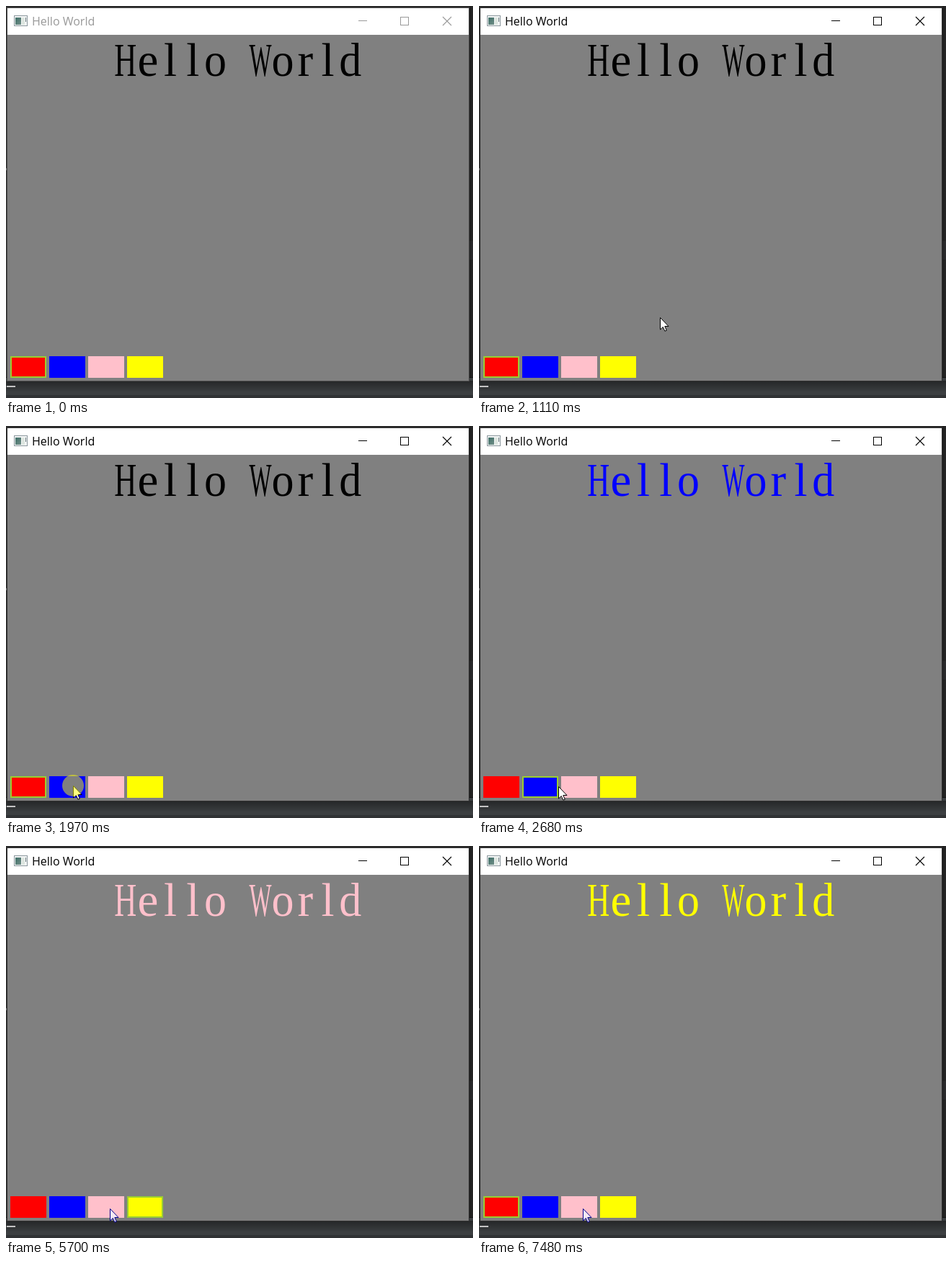
Write an HTML page with a canvas that moves like this. It is 648x544 px and loops after 8000 ms.

```html
<!DOCTYPE html>
<html lang="en">
<head>
<meta charset="utf-8">
<title>Hello World</title>
<style>
  html, body { margin: 0; width: 100%; height: 100%; overflow: hidden; background: #2b2b2b; }
  canvas { display: block; }
</style>
</head>
<body>
<canvas id="stage" width="648" height="544"></canvas>
<script>
const ctx = document.getElementById('stage').getContext('2d');
const LOOP = 8000;
const COLORS = ['#ff0000', '#0000ff', '#ffc0cb', '#ffff00'];

// Each entry: [start time, value]
const SELECTED = [[0, 0], [2220, 1], [3380, 2], [5700, 3], [7480, 0]];
const TEXT_COLOR = [[0, '#000000'], [2220, COLORS[1]], [3380, COLORS[2]], [6790, COLORS[3]]];
const MOVES = [
  { start: 340, end: 570, steps: 4, from: [502, 504], to: [361, 367], power: 1.6 },
  { start: 1110, end: 1750, steps: 9, from: [251, 432], to: [93, 499], power: 1.8 },
  { start: 2680, end: 2920, steps: 4, from: [110, 500], to: [144, 503], power: 1.5 }
];
const CLICKS = [[800, 960], [1970, 2220], [3150, 3380]];
const ARROW = [[0, 0], [0, 16.5], [3.8, 13], [6.4, 18.7], [8.8, 17.7], [6.3, 12], [11.5, 12]];

const valueAt = (track, t) => track.filter(([start]) => start <= t).pop()[1];

function rect(x, y, w, h, color) {
  ctx.fillStyle = color;
  ctx.fillRect(x, y, w, h);
}

function frame(x, y, w, h, color, line = 1) {
  ctx.strokeStyle = color;
  ctx.lineWidth = line;
  ctx.strokeRect(x + line / 2, y + line / 2, w - line, h - line);
}

function fade(x0, y0, x1, y1, w, h, alpha) {
  const g = ctx.createLinearGradient(x0, y0, x1, y1);
  g.addColorStop(0, `rgba(0,0,0,${alpha})`);
  g.addColorStop(1, 'rgba(0,0,0,0)');
  rect(x0, y0, w, h, g);
}

function cursorAt(t) {
  const m = MOVES.filter(move => move.start <= t).pop();
  if (!m) return null;
  const last = m.steps - 1;
  const gap = (m.end - m.start) / last;
  const step = Math.min(last, Math.floor((t - m.start) / gap + 0.001));
  const k = 1 - Math.pow(1 - step / last, m.power);
  return m.from.map((v, i) => Math.round(v + (m.to[i] - v) * k));
}

function drawDesktop() {
  rect(0, 0, 648, 544, '#2b2b2b');
  rect(643, 326, 5, 26, '#323335');
  rect(0, 515, 648, 1, '#151515');
  rect(0, 516, 648, 24, '#3c3f41');
  rect(0, 540, 648, 4, '#303234');
  fade(0, 520, 0, 536, 648, 16, 0.4);
  fade(643, 0, 651, 0, 5, 516, 0.3);
  rect(0, 225, 2, 3, '#777777');
  rect(1, 527, 12, 2, '#c4c4c4');
}

function drawIcon() {
  rect(11, 13, 19, 15, '#8b979d');
  rect(12, 14, 17, 13, '#f4f6f6');
  const g = ctx.createLinearGradient(13, 16, 21, 26);
  g.addColorStop(0, '#3f6f68');
  g.addColorStop(1, '#718f88');
  rect(13, 16, 8, 10, g);
  rect(22, 16, 4, 10, '#dce5df');
  rect(27, 16, 1, 6, '#66757b');
}

function drawTitleBar(active) {
  const ink = active ? '#000000' : '#999999';
  rect(2, 3, 640, 37, '#ffffff');
  drawIcon();
  ctx.fillStyle = ink;
  ctx.textAlign = 'left';
  ctx.font = '16px "Open Sans", "Noto Sans", sans-serif';
  ctx.fillText('Hello World', 36, 27);
  rect(489, 20, 12, 1, ink);
  frame(547, 15, 12, 12, ink);
  ctx.beginPath();
  ctx.moveTo(606, 15);
  ctx.lineTo(618, 27);
  ctx.moveTo(618, 15);
  ctx.lineTo(606, 27);
  ctx.lineWidth = 1.1;
  ctx.stroke();
}

// Half-width lettering: one even cell per character
function drawHeading(color) {
  ctx.fillStyle = color;
  ctx.textAlign = 'center';
  ctx.font = '65px "Liberation Serif", "Noto Serif", serif';
  [...'Hello World'].forEach((ch, i) => ctx.fillText(ch, 165.7 + i * 31.2, 97, 31));
}

function drawSwatches(selected) {
  COLORS.forEach((color, i) => {
    const x = 6 + i * 54;
    rect(x, 486, 50, 30, color);
    if (i === selected) frame(x, 486, 50, 30, '#9acd32', 2);
  });
}

function drawCursor([x, y], late) {
  ctx.beginPath();
  ARROW.forEach(([dx, dy]) => ctx.lineTo(x + dx + 0.5, y + dy + 0.5));
  ctx.closePath();
  ctx.fillStyle = late ? '#f6eaf3' : '#ffffff';
  ctx.fill();
  ctx.strokeStyle = late ? '#000090' : '#000000';
  ctx.lineWidth = 1;
  ctx.stroke();
}

function drawClick([x, y]) {
  ctx.beginPath();
  ctx.arc(x, y, 15, 0, Math.PI * 2);
  ctx.fillStyle = 'rgba(255,255,0,0.5)';
  ctx.fill();
}

function draw(t) {
  const active = t >= 800;
  drawDesktop();
  rect(1, 2, 642, 519, active ? '#303030' : '#4c4c4c');
  rect(2, 40, 640, 480, '#808080');
  drawTitleBar(active);
  drawHeading(valueAt(TEXT_COLOR, t));
  drawSwatches(valueAt(SELECTED, t));
  const tip = cursorAt(t);
  if (tip) drawCursor(tip, t >= 3380);
  if (CLICKS.some(([start, end]) => t >= start && t < end)) drawClick(tip);
}

const began = performance.now();
function tick() {
  draw((performance.now() - began) % LOOP);
  requestAnimationFrame(tick);
}
tick();
</script>
</body>
</html>
```
